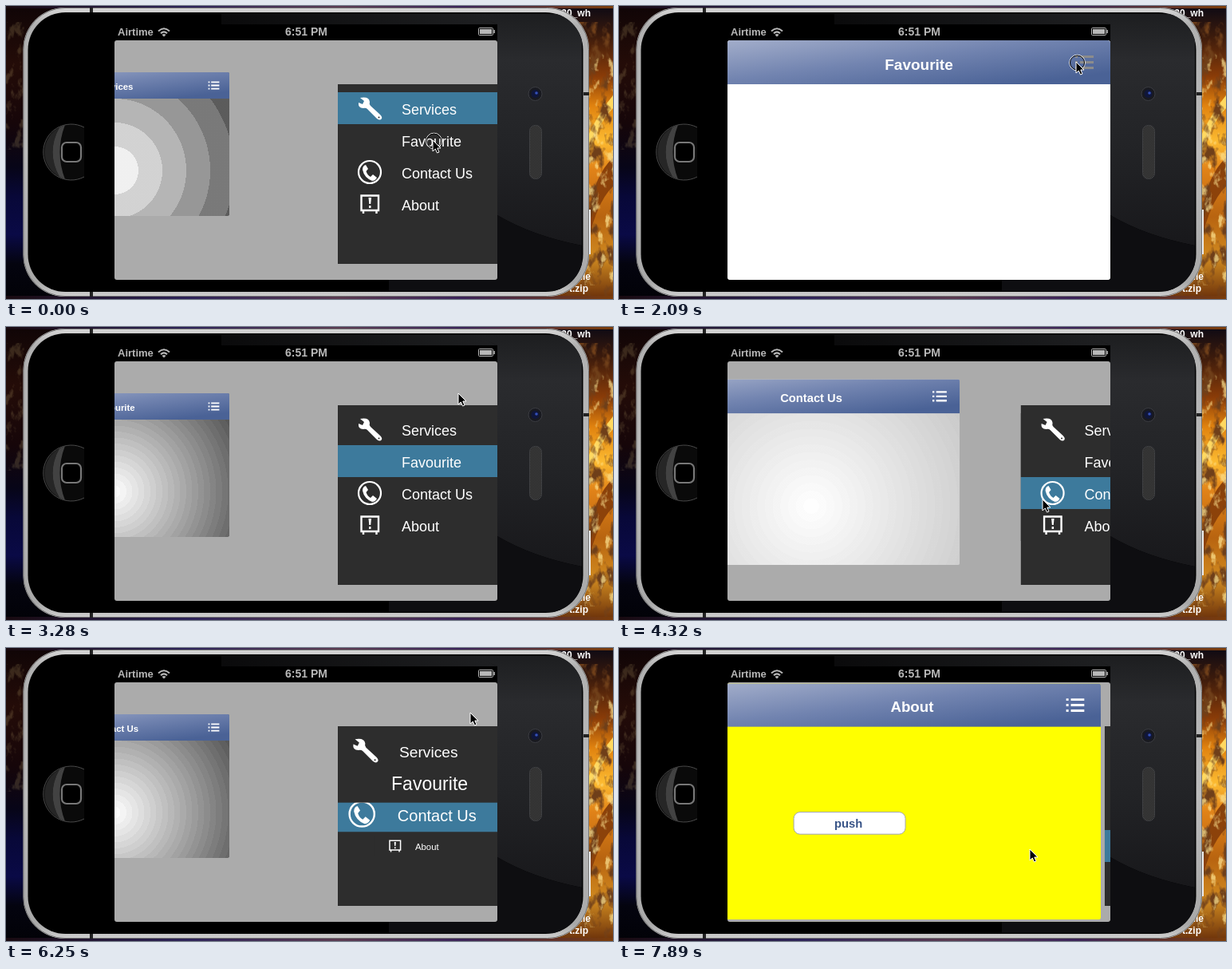
An HTML page that plays this animation: 761 px wide and 367 px high, repeating every 8 s.

```html
<!DOCTYPE html>
<html lang="en">
<head>
<meta charset="utf-8">
<title>Slide menu demo</title>
<style>
  html, body { margin: 0; width: 100%; height: 100%; overflow: hidden; background: #000; }
  svg { position: absolute; left: 0; top: 0; width: 761px; height: 367px; }
  text { font-family: "Liberation Sans", Arial, sans-serif; fill: #fff; }
  .bold { font-weight: bold; }
  .mid { text-anchor: middle; }
  .end { text-anchor: end; }
  .status { fill: #b8b8b8; }
</style>
</head>
<body>
<!-- desktop and phone -->
<svg viewBox="0 0 761 367" xmlns="http://www.w3.org/2000/svg">
  <defs>
    <linearGradient id="night" x2="0" y2="1">
      <stop offset="0" stop-color="#100506"/><stop offset=".2" stop-color="#240c08"/>
      <stop offset=".4" stop-color="#160609"/><stop offset=".55" stop-color="#070518"/>
      <stop offset=".65" stop-color="#080838"/><stop offset=".78" stop-color="#0a0a46"/>
      <stop offset=".88" stop-color="#04040f"/><stop offset="1" stop-color="#020207"/>
    </linearGradient>
    <linearGradient id="fire" x2="0" y2="1">
      <stop offset="0" stop-color="#0d0a14"/><stop offset=".1" stop-color="#3a1a0c"/>
      <stop offset=".24" stop-color="#8a3c08"/><stop offset=".34" stop-color="#e0820f"/>
      <stop offset=".46" stop-color="#fcba30"/><stop offset=".56" stop-color="#e08218"/>
      <stop offset=".72" stop-color="#b86410"/><stop offset=".86" stop-color="#d08a20"/>
      <stop offset="1" stop-color="#6a300a"/>
    </linearGradient>
    <linearGradient id="strip">
      <stop offset="0" stop-color="#180a10"/><stop offset=".3" stop-color="#2c2258"/>
      <stop offset=".55" stop-color="#5a3a50"/><stop offset=".75" stop-color="#3a2258"/>
      <stop offset="1" stop-color="#7a3c0a"/>
    </linearGradient>
    <filter id="embers" x="0" y="0" width="1" height="1">
      <feTurbulence type="fractalNoise" baseFrequency=".07 .04" numOctaves="4" seed="5"/>
      <feColorMatrix values="0 0 0 0 .16  0 0 0 0 .05  0 0 0 0 .01  5 0 0 0 -2.5"/>
    </filter>
    <filter id="sparks" x="0" y="0" width="1" height="1">
      <feTurbulence type="fractalNoise" baseFrequency=".09 .05" numOctaves="4" seed="11"/>
      <feColorMatrix values="0 0 0 0 1  0 0 0 0 .8  0 0 0 0 .3  6 0 0 0 -3.4"/>
    </filter>
    <linearGradient id="silver" x2="0" y2="1">
      <stop offset="0" stop-color="#d8d8d8"/><stop offset=".06" stop-color="#b0b0b0"/>
      <stop offset=".5" stop-color="#bcbcbc"/><stop offset=".95" stop-color="#a8a8a8"/>
      <stop offset="1" stop-color="#d0d0d0"/>
    </linearGradient>
    <linearGradient id="gloss" x2="0" y2="1">
      <stop offset="0" stop-color="#1d1e20"/><stop offset=".2" stop-color="#2a2b2e"/>
      <stop offset=".6" stop-color="#222326"/><stop offset="1" stop-color="#18181b"/>
    </linearGradient>
    <linearGradient id="topGloss">
      <stop offset="0" stop-color="#0a0a0b"/><stop offset="1" stop-color="#1f2022"/>
    </linearGradient>
    <pattern id="mesh" width="2" height="2" patternUnits="userSpaceOnUse">
      <rect width="2" height="2" fill="#1c1c1c"/>
      <path d="M0 0h1v1H0zM1 1h1v1H1z" fill="#4c4c4c"/>
    </pattern>
    <clipPath id="face"><rect x="27.500" y="8" width="696" height="350" rx="47"/></clipPath>
  </defs>

  <rect width="380" height="367" fill="url(#night)"/>
  <rect x="380" width="381" height="367" fill="url(#fire)"/>
  <path d="M761 128Q740 150 731 186V160Q744 132 761 112z" fill="#ffd860"/>
  <path d="M761 190Q736 214 731 262V290Q742 244 761 226z" fill="#8c420a"/>
  <rect x="690" y="20" width="71" height="347" filter="url(#embers)"/>
  <rect x="725" y="60" width="36" height="290" filter="url(#sparks)" opacity=".7"/>
  <rect y="20" width="30" height="160" filter="url(#sparks)" opacity=".15"/>
  <path d="M0 0H761V3H0zM0 363H761V367H0z" fill="url(#strip)"/>
  <rect x="730" y="255" width="3" height="56" fill="#eee"/>
  <g font-size="12">
    <text class="bold end" x="733" y="13">30_wh</text>
    <text class="bold end" x="733" y="343">file</text>
    <text class="bold end" x="730" y="358">t.zip</text>
  </g>

  <rect x="21.500" y="2" width="709.500" height="362" rx="52" fill="url(#silver)"/>
  <rect x="22" y="2.500" width="708.500" height="361" rx="52" fill="none" stroke="#777"/>
  <rect x="27.500" y="8" width="696" height="350" rx="47" fill="#000"/>
  <g clip-path="url(#face)">
    <path d="M270 10H590L616 23H270z" fill="url(#topGloss)"/>
    <path d="M588 10H722V300Q660 288 616 262V23z" fill="url(#gloss)"/>
    <path d="M616 262Q660 288 722 300V357H480V343H616z" fill="#0e0e11"/>
  </g>
  <path d="M105 2h4v6h-4zM105 358h4v6h-4zM724 108h7v4h-7z" fill="#222"/>
  <path d="M98 152A35 35 0 1 0 98 214" fill="#0a0a0a" stroke="#4a4a4a"/>
  <path d="M67 152A35 35 0 0 0 67 214Q50 183 67 152z" fill="#262626"/>
  <path d="M67 152Q50 183 67 214L74 217Q61 183 74 149z" fill="#424242"/>
  <rect x="70" y="171" width="24" height="24" rx="6" fill="#000" stroke="#777" stroke-width="2.200"/>
  <circle cx="663.500" cy="110" r="8.500" fill="#191a20" stroke="#3c3d42"/>
  <circle cx="663.500" cy="110" r="5" fill="#10163a"/>
  <circle cx="665" cy="109" r="1.800" fill="#3450b8"/>
  <rect x="656.500" y="149.500" width="15" height="67" rx="7" fill="url(#mesh)" stroke="#3f4043"/>
</svg>

<svg viewBox="0 0 761 367" xmlns="http://www.w3.org/2000/svg">
  <defs>
    <linearGradient id="bar" gradientUnits="userSpaceOnUse" x1="0" y1="0" x2="12" y2="98">
      <stop offset="0" stop-color="#a2adca"/><stop offset=".5" stop-color="#7284b0"/>
      <stop offset="1" stop-color="#4a6296"/>
    </linearGradient>
    <radialGradient id="coarse" gradientUnits="userSpaceOnUse" cx="240" cy="205" r="300"/>
    <radialGradient id="fine" gradientUnits="userSpaceOnUse" cx="240" cy="205" r="300"/>
    <clipPath id="screen"><rect x="136" y="43" width="480" height="300" rx="3"/></clipPath>
    <clipPath id="menuBox"><rect x="416" y="98" width="260" height="225"/></clipPath>
    <clipPath id="pageBox"><rect width="480" height="300" rx="3"/></clipPath>
  </defs>

  <!-- status bar -->
  <rect x="136" y="23" width="480" height="22" fill="#000"/>
  <text class="bold status" x="140" y="37" font-size="13">Airtime</text>
  <text class="bold status mid" x="376.500" y="37" font-size="14">6:51 PM</text>
  <path d="M191 31.500Q198 25 205 31.500M194 34.300Q198 30.500 202 34.300" fill="none" stroke="#b8b8b8" stroke-width="2"/>
  <path d="M195.500 36Q198 34 200.500 36L198 38.500z" fill="#b8b8b8"/>
  <rect x="592.500" y="27.500" width="18" height="9" rx="1" fill="none" stroke="#b8b8b8"/>
  <path d="M594 29h15v6h-15zM611.500 30h1.500v4h-1.500z" fill="#b8b8b8"/>

  <!-- app -->
  <g clip-path="url(#screen)">
    <rect x="136" y="43" width="480" height="300" fill="#ababab"/>
    <g id="menu">
      <g clip-path="url(#menuBox)">
        <rect x="416" y="98" width="260" height="225" fill="#2d2d2d"/>
        <g id="rows"></g>
      </g>
    </g>
    <g id="page">
      <g clip-path="url(#pageBox)">
        <rect id="body" width="480" height="300"/>
        <g id="push">
          <rect x="89.500" y="163.500" width="142" height="28" rx="8" fill="#fff" stroke="#a0a4ac"/>
          <text class="bold mid" x="159" y="183" font-size="15" style="fill:#385487">push</text>
        </g>
        <rect id="dim" width="480" height="300"/>
        <rect width="480" height="55" fill="url(#bar)"/>
        <text id="title" class="bold mid" x="240" y="36.500" font-size="19"></text>
        <path id="button" d="M436 19h3v3h-3zM436 26h3v3h-3zM436 33h3v3h-3zM442 19h17v3h-17zM442 26h17v3h-17zM442 33h17v3h-17z"/>
      </g>
    </g>
  </g>

  <g id="cursor">
    <g id="ring" fill="none">
      <circle cx="1.500" cy="1" r="9.800" stroke="#fff" stroke-width="1"/>
      <circle cx="1.500" cy="1" r="9" stroke="#000" stroke-width="1"/>
    </g>
    <path d="M0 0V14L3.300 11L5.500 16L8 15L5.800 10H10z" stroke="#fff"/>
  </g>
</svg>

<script>
const LOOP = 8000, TICK = 148.75;
const $ = id => document.getElementById(id);
const clamp = v => Math.min(1, Math.max(0, v));

const items = [
  ['Services', `<path d="M444 115L449 119L447 123L442 121Q441 128 448 128Q451 127 453 129L465 141Q469 144 471 141Q472 139 469 136L457 125Q455 123 456 120Q455 113 444 115z" fill="#fff"/>
    <circle cx="467.500" cy="139.500" r="1" fill="#2d2d2d"/>`],
  ['Favourite', ''],
  ['Contact Us', `<circle cx="456" cy="208" r="14" fill="none" stroke="#fff" stroke-width="2.200"/>
    <path d="M451 199L454 204L451.500 207Q453 212 457 214L460 211L465 215Q463 219 459 219Q449 215 447 205Q447 200 451 199z" fill="#fff"/>`],
  ['About', `<path d="M445.500 237.500H467V256H445.500zM448 257V260M464.500 257V260" fill="none" stroke="#fff" stroke-width="2.400"/>
    <path d="M454.500 240h3.500l-.8 8h-1.900zM455 250h2.500v3h-2.500z" fill="#fff"/>`]
];

// Earlier rows are stacked above later ones.
$('rows').innerHTML = items.map(([label, icon], i) => `
  <g id="row${i}"><rect id="fill${i}" x="416" y="${108 + 40 * i}" width="252" height="40"/>
  ${icon}<text x="496" y="${136 + 40 * i}" font-size="18">${label}</text></g>`).reverse().join('');

function addBands(id, width) {
  let stops = '';
  for (let r = 0; r < 300; r += width) {
    const alpha = .66 * (r + width / 2) / 283;
    for (const edge of [r, r + width])
      stops += `<stop offset="${edge / 300}" stop-opacity="${alpha}"/>`;
  }
  $(id).innerHTML = stops;
}
addBands('coarse', 50);
addBands('fine', 12.5);

const toggles = [[-2000, 1], [603, 0], [2110, 1], [4180, 0], [5985, 1], [7628, 0]];
const presses = [0, 14, 27, 40, 45], buttonPresses = [14, 40];
const path = [
  [0, 535, 168], [1, 534, 176], [9, 541, 158], [10, 556, 112], [11, 570, 80], [12, 573, 72],
  [14, 573, 70], [22, 567, 83], [23, 556, 130], [24, 538, 190], [25, 531, 216],
  [33, 548, 180], [34, 570, 135], [35, 580, 106], [36, 580, 95], [37, 581, 88], [38, 582, 81],
  [43, 572, 120], [44, 545, 190], [45, 515, 250], [46, 515, 252]
];
const lastBefore = (list, t) => list.filter(e => e[0] <= t).pop();

// Row pops up past full size, then settles.
function popScale(t) {
  if (t <= 0) return 0;
  return t < 172 ? 1.38 * t / 172 : 1.38 - .38 * clamp((t - 172) / 105);
}

function render(ms) {
  const step = Math.floor((ms + 4) / TICK), t = step * 148.9;
  const [start, opening] = lastBefore(toggles, t);
  const eased = (1 - Math.cos(Math.PI * clamp((t - start) / (opening ? 250 : 300)))) / 2;
  const open = opening ? eased : 1 - eased;
  const selected = toggles.filter(([at, to]) => !to && at <= t).length;

  $('menu').setAttribute('transform', `translate(${200 * (1 - open)} 0)`);
  items.forEach((_, i) => {
    const y = 128 + 40 * i, s = opening ? popScale(t - start - 10 - 60 * i) : 1;
    $('row' + i).setAttribute('transform', `translate(542 ${y}) scale(${s}) translate(-542 ${-y})`);
    $('fill' + i).setAttribute('fill', i === selected ? '#3d7a9c' : '#2d2d2d');
  });

  $('page').setAttribute('transform',
    `translate(${376 - 240 * open} ${193 - 20 * open}) scale(${1 - .4 * open}) translate(-240 -150)`);
  $('body').setAttribute('fill', selected === 3 ? '#ff0' : '#fff');
  $('push').setAttribute('visibility', selected === 3 ? 'visible' : 'hidden');
  $('dim').setAttribute('fill', `url(#${selected ? 'fine' : 'coarse'})`);
  $('dim').setAttribute('opacity', open * open);
  $('title').textContent = items[selected][0];
  $('button').setAttribute('fill', buttonPresses.includes(step) ? '#8c8c8c' : '#fff');

  const [, x, y] = lastBefore(path, step);
  $('cursor').setAttribute('transform', `translate(${x} ${y})`);
  $('ring').setAttribute('visibility', presses.includes(step) ? 'visible' : 'hidden');
}

const began = performance.now();
function loop() {
  render((performance.now() - began) % LOOP);
  requestAnimationFrame(loop);
}
loop();
</script>
</body>
</html>
```
